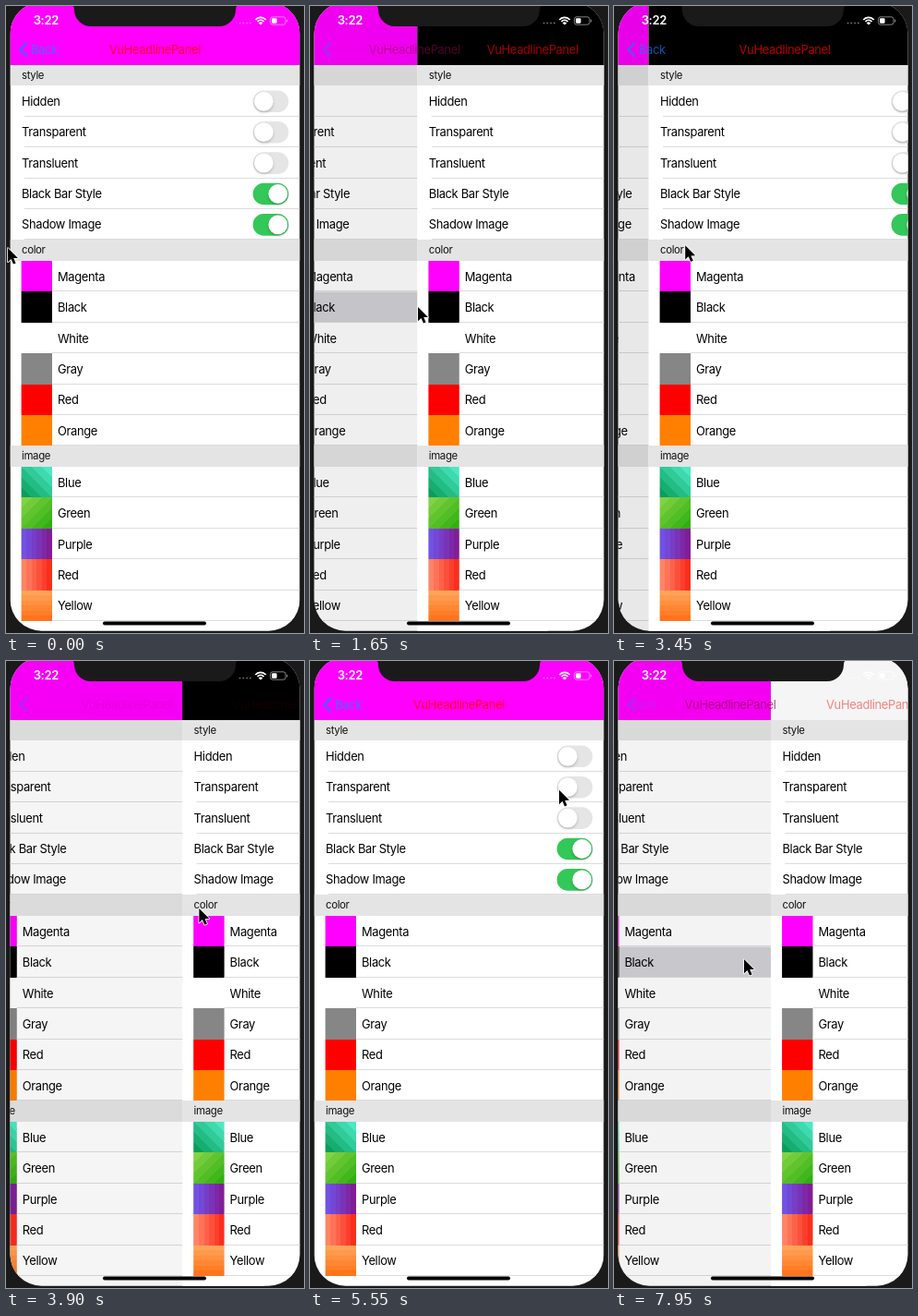
An HTML page with a canvas that plays this animation: 323 by 679 pixels, repeating every 8000 ms.

```html
<!DOCTYPE html>
<html>
<head>
<meta charset="utf-8">
<style>
html, body { margin: 0; width: 100%; height: 100%; overflow: hidden; background: #1a1a1a; }
canvas { display: block; }
</style>
</head>
<body>
<canvas id="stage" width="323" height="679"></canvas>
<script>
const c = document.getElementById('stage').getContext('2d');
const LOOP = 8000, STEP = 150;
const LEFT = 4.5, WIDTH = 314, ROW = 33.4;
const TITLE = 'VuHeadlinePanel';

const START = [2, 262];
// start time, end time, end position
const moves = [
  [0, 300, -15, 262], [450, 750, 3, 266], [900, 1500, 117, 326], [1950, 2550, -2, 254],
  [3050, 4050, 223, 269], [4050, 4800, 233, 148], [4950, 5850, 283, 137], [6900, 7800, 141, 323]
];

const styles = ['Hidden', 'Transparent', 'Transluent', 'Black Bar Style', 'Shadow Image'];
const colors = [['Magenta', '#f0f'], ['Black', '#000'], ['White', '#fff'],
  ['Gray', '#868686'], ['Red', '#f00'], ['Orange', '#ff8000']];
// name, first and last colour, direction across the thumbnail
const images = [
  ['Blue', [8, 158, 92], [76, 232, 194], 0, 1, 1, 0],
  ['Green', [130, 210, 68], [48, 176, 16], 0, 0, 1, 1],
  ['Purple', [112, 82, 228], [128, 30, 152], 0, 0, 1, 0],
  ['Red', [255, 132, 102], [250, 46, 30], 0, 0, 1, 0],
  ['Yellow', [255, 164, 88], [255, 116, 28], 0, 0, 0, 1]
];

const clamp = u => Math.min(1, Math.max(0, u));
const smooth = u => (u = clamp(u)) * u * (3 - 2 * u);
const easeOut = u => 1 - (1 - clamp(u)) ** 3;

// How far the upper page has slid in: push, dragged back, pushed again
const slide = t => easeOut((t - 1500) / 515) - smooth((t - 3200) / 1243) + easeOut((t - 7851) / 515);

function cursorAt(t) {
  let [x, y] = START;
  for (const [from, to, nextX, nextY] of moves) {
    const u = smooth((t - from) / (to - from));
    x += (nextX - x) * u;
    y += (nextY - y) * u;
  }
  return [x, y];
}

function rect(x, y, w, h, fill, r = 0) {
  c.fillStyle = fill;
  c.beginPath();
  c.roundRect(x, y, w, h, r);
  c.fill();
}

function text(str, x, y, fill = '#000', size = 12.9, weight = 400, align = 'left') {
  c.font = `${weight} ${size}px Inter, sans-serif`;
  c.letterSpacing = '-0.33px';
  c.textAlign = align;
  c.fillStyle = fill;
  c.fillText(str, x, y);
}

function faded(alpha, draw) {
  c.save();
  c.globalAlpha = clamp(alpha);
  draw();
  c.restore();
}

function toggle(y, on) {
  rect(267.6, y - 11.8, 38.7, 23.6, on ? '#34c759' : '#e5e5e6', 11.8);
  c.save();
  c.shadowColor = 'rgba(0,0,0,.22)';
  c.shadowBlur = 3;
  c.shadowOffsetY = 1.5;
  rect(on ? 284.4 : 269, y - 10.4, 20.8, 20.8, '#fff', 10.4);
  c.restore();
}

function bands([, from, to, x0, y0, x1, y1], y) {
  const g = c.createLinearGradient(17 + x0 * 33, y + y0 * ROW, 17 + x1 * 33, y + y1 * ROW);
  const n = 6;
  for (let i = 0; i < n; i++) {
    const shade = `rgb(${from.map((v, k) => v + (to[k] - v) * i / (n - 1))})`;
    g.addColorStop(i / n, shade);
    g.addColorStop((i + 1) / n, shade);
  }
  return g;
}

function section(name, y, bottom) {
  rect(LEFT, y, WIDTH, bottom - y, '#e4e4e4');
  text(name, 17, y + 15.4, '#111', 11.4);
}

function separator(x, y) {
  rect(x, Math.round(y) - 1, LEFT + WIDTH - x, 1, '#dcdcde');
}

function swatchRow(name, fill, y) {
  const top = Math.round(y);
  rect(16.6, top, 33.4, Math.round(y + ROW) - top, fill);
  text(name, 56, y + 21.7);
  separator(50, y + ROW);
}

function page(bar, selected, transparentOn) {
  rect(LEFT, -4, WIDTH, 690, '#fff');
  rect(LEFT, -4, WIDTH, 68, bar);
  styles.forEach((name, i) => {
    const y = 86.3 + i * ROW;
    text(name, 17, y + 21.5);
    toggle(y + 17, i > 2 || (i === 1 && transparentOn));
    separator(20, y + ROW);
  });
  colors.forEach(([name, fill], i) => {
    const y = 276 + i * ROW;
    if (selected && name === 'Black') rect(LEFT, y, WIDTH, ROW, '#d1d1d6');
    swatchRow(name, fill, y);
  });
  images.forEach((item, i) => {
    const y = 499 + i * ROW;
    swatchRow(item[0], bands(item, y), y);
  });
  section('style', 64, 86);
  section('color', 253, 276);
  section('image', 476, 499);
}

function navItems(p, popping) {
  const behind = popping ? (1 - p) ** 4 : p < 1 ? 1 - .7 * p : 0;
  const front = popping ? p ** 3 : p;
  const title = (x, fill) => text(TITLE, x, 51.7, fill, 12.9, 400, 'center');
  faded(behind, () => title(161.5 - 75 * p, p < .05 ? '#ff0030' : '#900050'));
  faded(front, () => title(161.5 + 224 * (1 - p), '#f00'));
  faded(popping ? behind ** 2 : 1 - 1.6 * p, () => text('Back', 27 - 20 * p, 51.7, '#4a68ff'));
  faded((p - .7) / .3, () => text('Back', 27, 51.7, '#0a84ff'));
  faded(.3 + Math.abs(p - .5) * 1.4, () => {
    c.strokeStyle = p > .9 ? '#0a84ff' : '#2f6cff';
    c.lineWidth = 2;
    c.beginPath();
    c.moveTo(22.7, 39.8);
    c.lineTo(15.3, 47.2);
    c.lineTo(22.7, 54.6);
    c.stroke();
  });
}

function statusBar() {
  text('3:22', 43.3, 20.4, '#fff', 13, 600, 'center');
  for (let i = 0; i < 4; i++) rect(252.5 + i * 3.8, 17.5, 2, 2, 'rgba(255,255,255,.4)', 1);
  c.strokeStyle = '#fff';
  c.lineWidth = 1.7;
  const from = -Math.PI * .77, to = -Math.PI * .23;
  for (const r of [4.6, 7.6]) {
    c.beginPath();
    c.arc(276, 20, r, from, to);
    c.stroke();
  }
  c.fillStyle = '#fff';
  c.beginPath();
  c.moveTo(276, 20.5);
  c.arc(276, 20.5, 3, from, to);
  c.fill();
  c.strokeStyle = 'rgba(255,255,255,.5)';
  c.lineWidth = 1;
  c.beginPath();
  c.roundRect(286.5, 11.8, 16.5, 8.4, 2.4);
  c.stroke();
  rect(304, 14.5, 1.2, 3, 'rgba(255,255,255,.5)', .6);
  rect(288, 13.3, 5.6, 5.4, '#fff', 1.2);
}

function notch() {
  c.fillStyle = '#1a1a1a';
  c.beginPath();
  c.moveTo(70, -1);
  c.quadraticCurveTo(74, -1, 74, 4);
  c.arcTo(74, 22, 92, 22, 18);
  c.arcTo(249, 22, 249, 4, 18);
  c.lineTo(249, 4);
  c.quadraticCurveTo(249, -1, 253, -1);
  c.fill();
}

function pointer(x, y) {
  c.save();
  c.translate(x, y);
  c.beginPath();
  [[0, 0], [0, 15.3], [3.5, 12], [6, 17.6], [8.6, 16.5], [6.2, 11.1], [11, 11]]
    .forEach(p => c.lineTo(...p));
  c.closePath();
  c.lineJoin = 'round';
  c.lineWidth = 1.6;
  c.strokeStyle = '#fff';
  c.stroke();
  c.fillStyle = '#000';
  c.fill();
  c.restore();
}

function render(t) {
  const p = slide(t);
  const popping = t > 3000 && t < 4800;
  const selected = (t >= 1500 && t < 3000) || t >= 7800;
  const transparentOn = t >= 7050;
  const shifted = (dx, ...look) => {
    c.save();
    c.translate(dx, 0);
    page(...look);
    c.restore();
  };
  rect(0, 0, 323, 679, '#1a1a1a');

  c.save();
  c.beginPath();
  c.roundRect(LEFT, -4, WIDTH, 680.7, 34);
  c.clip();
  shifted(-.3 * WIDTH * p, '#f0f', selected, transparentOn);
  rect(LEFT, -4, WIDTH, 690, `rgba(0,0,0,${.1 * p})`);
  if (p > 0) shifted(WIDTH * (1 - p), transparentOn ? '#f5f5f5' : '#000', false, transparentOn);
  navItems(p, popping);
  statusBar();
  rect(105, 666.5, 112, 4, '#000', 2);
  c.restore();

  notch();
  pointer(...cursorAt(t));
}

function tick(now) {
  render(Math.floor(now % LOOP / STEP) * STEP);
  requestAnimationFrame(tick);
}
requestAnimationFrame(tick);
</script>
</body>
</html>
```
